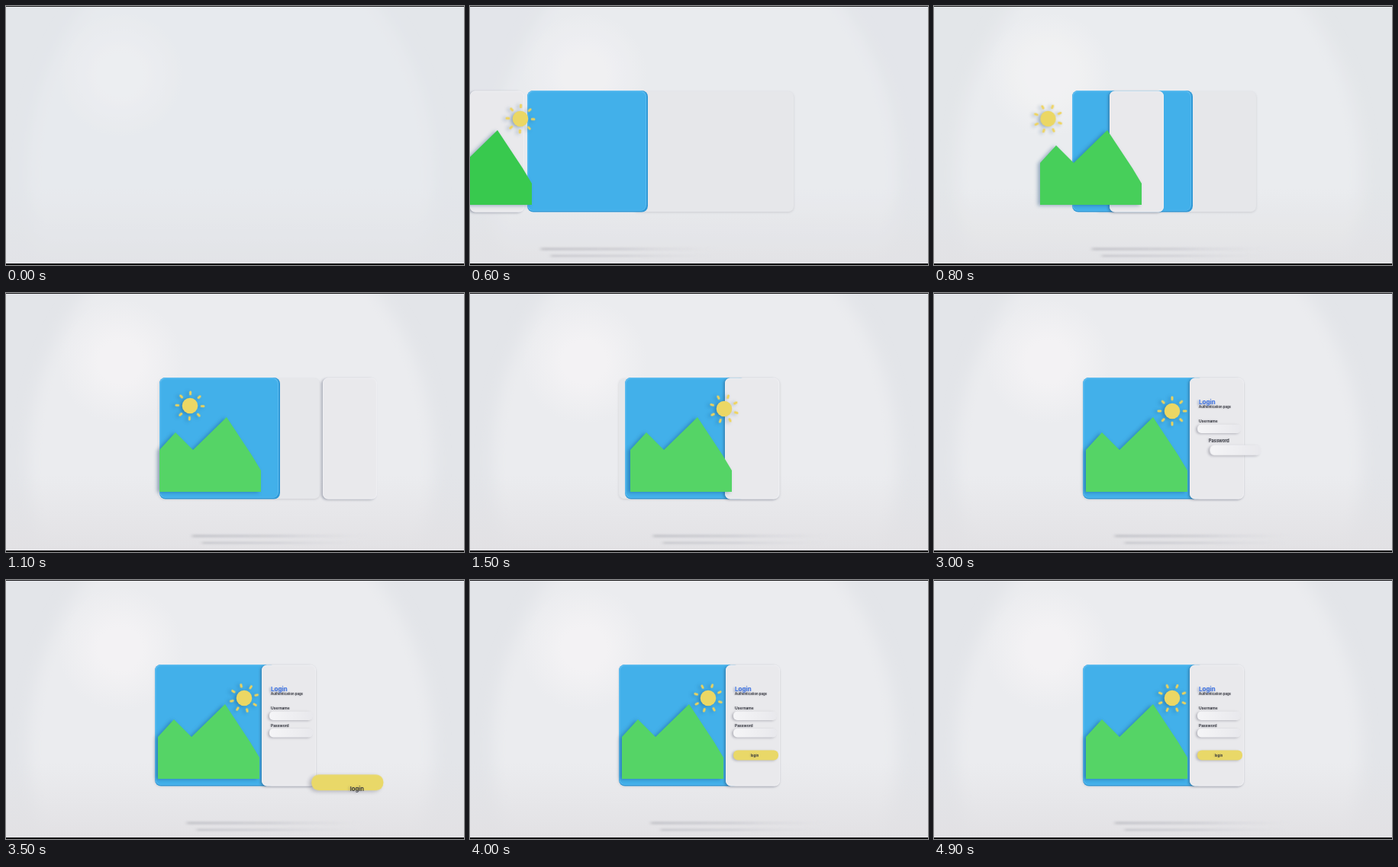
Write an HTML page that moves like this. It is 600 by 340 pixels and loops after 5000 ms.

```html
<!DOCTYPE html>
<html lang="en">
<head>
<meta charset="utf-8">
<title>Login card</title>
<style>
html, body { margin: 0; width: 100%; height: 100%; overflow: hidden; background: #ebecef; }
svg { display: block; width: 600px; height: 340px; font-family: Inter, "Open Sans", sans-serif; }

/* Everything is paused and scrubbed through --t (milliseconds). */
.move, .fly {
  animation: var(--track) 5000ms linear both paused;
  animation-delay: calc(var(--t, 0) * -1ms);
}
.fly {
  transform-origin: 300px 170px;
  animation: fly 700ms cubic-bezier(.215, .61, .355, 1) both paused;
  animation-delay: calc((var(--at) - var(--t, 0)) * 1ms);
}
.base { --track: base; }
.sky { --track: sky; }
.sheet { --track: sheet; }
.hills { --track: hills; }
.sun { --track: sun; }
.rays { --track: spin; }
.floor { --track: floor; }
.tint { --track: tint; }
.green { --track: green; }

@keyframes fly {
  0% { transform: translateX(100px) scale(3.1); visibility: hidden; }
  1% { visibility: visible; }
  100% { transform: none; visibility: visible; }
}
@keyframes tint {
  0%, 4% { opacity: .4; }
  20%, 100% { opacity: 0; }
}
@keyframes green {
  0%, 12% { fill: #38c94e; }
  20%, 100% { fill: #55d466; }
}
@keyframes base {
  0%, 4% { transform: translateX(-430px); }
  6% { transform: translateX(-280px); }
  8% { transform: translateX(-130px); }
  10% { transform: translateX(-20px); }
  12% { transform: translateX(18px); }
  14% { transform: translateX(20px); }
  18% { transform: translateX(12px); }
  22% { transform: translateX(5px); }
  30%, 100% { transform: none; }
}
@keyframes sky {
  0%, 4% { transform: translateX(-380px); }
  6% { transform: translateX(-335px); }
  8% { transform: translateX(-275px); }
  10% { transform: translateX(-203px); }
  12% { transform: translateX(-120px); }
  14% { transform: translateX(-42px); }
  16% { transform: translateX(-14px); }
  18% { transform: translateX(-2px); }
  22% { transform: translateX(6px); }
  26% { transform: translateX(9px); }
  30% { transform: translateX(8px); }
  38% { transform: translateX(3px); }
  50%, 100% { transform: none; }
}
@keyframes sheet {
  0%, 8% { transform: translateX(-430px); }
  10% { transform: translateX(-405px); }
  12% { transform: translateX(-335px); }
  14% { transform: translateX(-230px); }
  16% { transform: translateX(-105px); }
  18% { transform: translateX(5px); }
  20% { transform: translateX(62px); }
  22% { transform: translateX(80px); }
  24% { transform: translateX(65px); }
  26% { transform: translateX(30px); }
  28% { transform: translateX(8px); }
  30% { transform: translateX(-1px); }
  36%, 100% { transform: none; }
}
@keyframes hills {
  0%, 8% { transform: translateX(-400px); }
  10% { transform: translateX(-335px); }
  12% { transform: translateX(-251px); }
  14% { transform: translateX(-134px); }
  16% { transform: translateX(-60px); }
  18% { transform: translateX(-25px); }
  20% { transform: translateX(-6px); }
  22% { transform: translateX(2px); }
  26% { transform: translateX(10px); }
  30% { transform: translateX(11px); }
  38% { transform: translateX(4px); }
  50%, 100% { transform: none; }
}
@keyframes sun {
  0%, 8% { transform: translate(-350px, -7px); }
  10% { transform: translate(-300px, -7px); }
  12% { transform: translate(-246px, -7px); }
  14% { transform: translate(-200px, -7px); }
  18% { transform: translate(-125px, -7px); }
  22% { transform: translate(-71px, -7px); }
  24% { transform: translate(-36px, -6px); }
  26% { transform: translate(-8px, -5px); }
  28% { transform: translate(13px, -4px); }
  30% { transform: translate(21px, -3px); }
  34% { transform: translate(14px, -2px); }
  40% { transform: translate(5px, -1px); }
  50%, 100% { transform: none; }
}
@keyframes spin {
  0% { transform: rotate(-40deg); }
  12% { transform: rotate(2deg); }
  22% { transform: rotate(47deg); }
  30% { transform: rotate(63deg); }
  60% { transform: rotate(135deg); }
  80% { transform: rotate(198deg); }
  98%, 100% { transform: rotate(247.5deg); }
}
@keyframes floor {
  0%, 4% { transform: translateX(-560px); }
  8% { transform: translateX(-330px); }
  12% { transform: translateX(-144px); }
  16% { transform: translateX(-30px); }
  20% { transform: translateX(4px); }
  22% { transform: translateX(7px); }
  30% { transform: translateX(3px); }
  50%, 100% { transform: none; }
}

.sheet { filter: drop-shadow(-1.5px 1px 1.5px rgba(30, 40, 70, .3)); }
.base { filter: drop-shadow(0 1px 1.5px rgba(60, 60, 75, .16)); }
.hills, .sun { filter: drop-shadow(-3px 1px 2.5px rgba(10, 60, 110, .38)); }
.field, .button { filter: drop-shadow(-2px 1.5px 1.5px rgba(60, 60, 80, .3)); }
.title { font-weight: 700; font-size: 8px; fill: #3f74e4; filter: drop-shadow(-2px 1px 1px rgba(60, 80, 130, .4)); }
.label { font-weight: 600; fill: #30323a; filter: drop-shadow(-1px .5px .8px rgba(60, 60, 80, .35)); }
</style>
</head>
<body>
<svg viewBox="0 0 600 340">
  <defs>
    <filter id="soft" x="-30%" y="-30%" width="160%" height="160%"><feGaussianBlur stdDeviation="10"/></filter>
    <filter id="thin" x="-10%" y="-100%" width="120%" height="300%"><feGaussianBlur stdDeviation="2 .9"/></filter>
    <radialGradient id="glow">
      <stop offset=".35" stop-color="#f3f2f4"/>
      <stop offset="1" stop-color="#f3f2f4" stop-opacity="0"/>
    </radialGradient>
    <linearGradient id="ground" x2="0" y2="1">
      <stop offset="0" stop-color="#e2e1e4" stop-opacity="0"/>
      <stop offset="1" stop-color="#e2e1e4"/>
    </linearGradient>
    <linearGradient id="streak">
      <stop offset="0" stop-color="#c9c9ce"/>
      <stop offset=".45" stop-color="#d2d2d7"/>
      <stop offset="1" stop-color="#dedee2" stop-opacity="0"/>
    </linearGradient>
    <linearGradient id="pill">
      <stop offset="0" stop-color="#f5f5f7"/>
      <stop offset="1" stop-color="#e8e8ec"/>
    </linearGradient>
  </defs>

  <rect width="600" height="340" fill="#e3e5e9"/>
  <ellipse cx="295" cy="220" rx="265" ry="316" fill="#ebecef" filter="url(#soft)"/>
  <circle cx="150" cy="90" r="82" fill="url(#glow)"/>
  <rect y="240" width="600" height="100" fill="url(#ground)"/>
  <rect class="move tint" width="600" height="340" fill="#e2e6ea"/>

  <g class="move floor" fill="url(#streak)" filter="url(#thin)">
    <rect x="237" y="317" width="230" height="4"/>
    <rect x="250" y="326.5" width="210" height="3"/>
  </g>

  <g class="move base"><rect x="195" y="112" width="211" height="158" rx="7" fill="#e6e7ea"/></g>

  <g class="move sky">
    <rect x="195" y="111" width="158" height="159.500" rx="8" fill="#2f98d6"/>
    <rect x="195" y="111" width="156" height="158" rx="8" fill="#5dbcf0"/>
    <rect x="196.500" y="112.500" width="153.500" height="156" rx="7" fill="#42b0ea"/>
  </g>

  <g class="move sheet">
    <rect x="335" y="111.500" width="71" height="159" rx="7" fill="#e9e9ec"/>
    <rect x="335.500" y="112" width="70" height="158" rx="6.500" fill="none" stroke="#f1f1f4" stroke-opacity=".8"/>
  </g>

  <g class="move hills">
    <path class="move green" d="M199 206 220 183 243 206 287 163 320 213 332 233V261H199Z"/>
  </g>

  <g class="move sun">
    <g transform="translate(312 155)">
      <circle r="10.300" fill="#ebd764"/>
      <g class="move rays" id="rays" stroke="#efd35a" stroke-width="3" stroke-linecap="round"></g>
    </g>
  </g>

  <text class="fly title" style="--at:1580" x="347" y="146">Login</text>
  <text class="fly label" style="--at:1980" x="347" y="151" font-size="4.300">Authentication page</text>
  <text class="fly label" style="--at:2230" x="347" y="170" font-size="5">Username</text>
  <rect class="fly field" style="--at:2330" x="345" y="172.500" width="57" height="11.500" rx="5" fill="url(#pill)"/>
  <text class="fly label" style="--at:2570" x="347" y="192.500" font-size="5">Password</text>
  <rect class="fly field" style="--at:2600" x="345" y="195" width="57" height="11.500" rx="5" fill="url(#pill)"/>
  <rect class="fly button" style="--at:3270" x="345" y="223.500" width="59" height="13" rx="6" fill="#e9d868"/>
  <text class="fly label" style="--at:3300" x="373" y="232" font-size="4.500" text-anchor="middle">login</text>

  <path d="M0 .5H600" stroke="#1c1c1e"/>
  <path d="M0 339H600" stroke="#111113" stroke-width="2"/>
</svg>
<script>
const LOOP = 5000, STEP = 100;
const root = document.documentElement;
const rays = document.getElementById("rays");

for (let i = 0; i < 8; i++) {
  const ray = document.createElementNS("http://www.w3.org/2000/svg", "path");
  ray.setAttribute("d", "M0 -15.2V-18");
  ray.setAttribute("transform", `rotate(${i * 45})`);
  rays.append(ray);
}

// The picture holds for one step, so time is rounded down to it.
function draw() {
  const t = performance.now() % LOOP;
  root.style.setProperty("--t", Math.floor(t / STEP) * STEP);
  requestAnimationFrame(draw);
}
draw();
</script>
</body>
</html>
```
